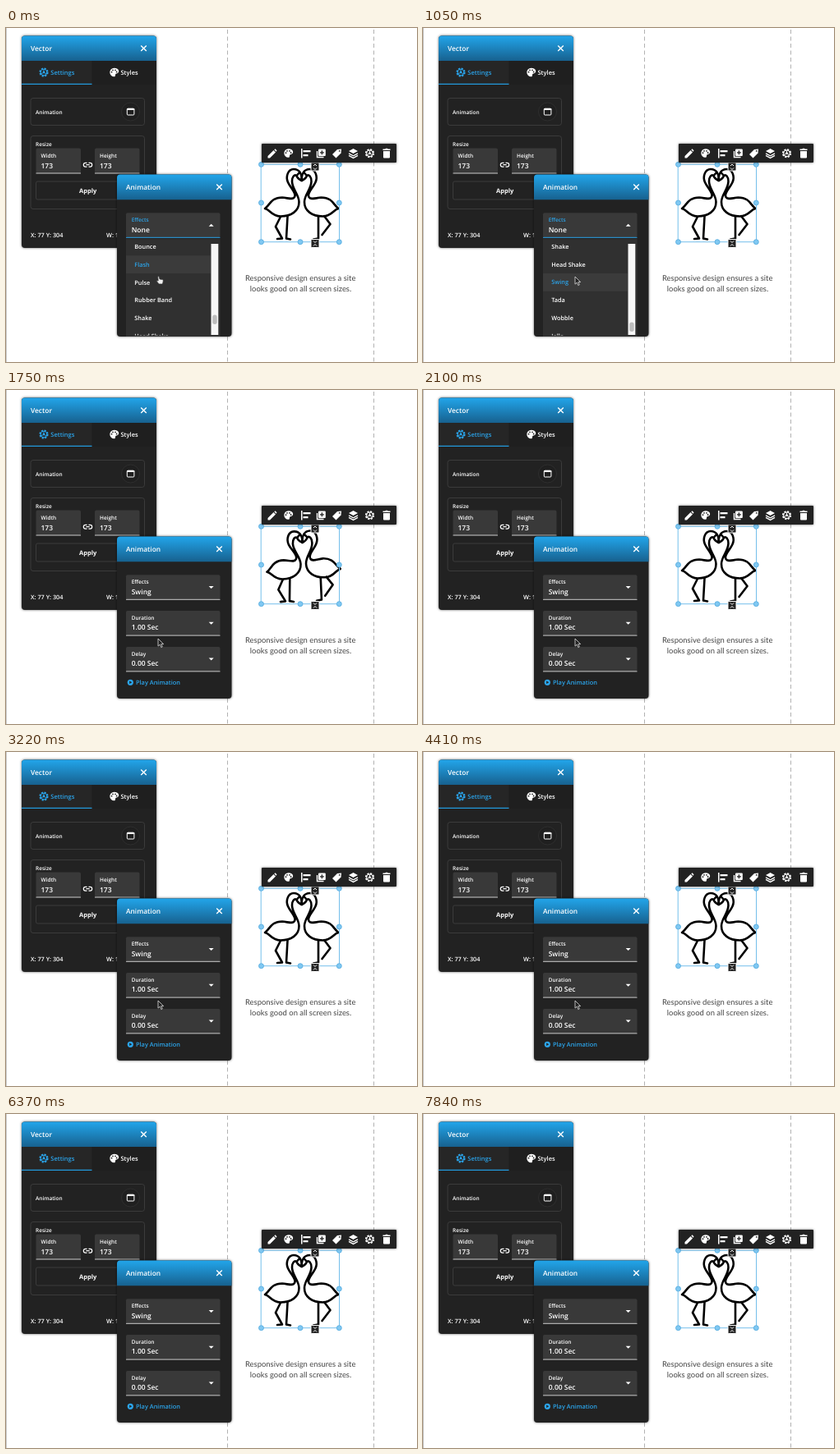
Animation of 500 by 407 pixels, one loop 7910 ms. Source, as an HTML page:

```html
<!DOCTYPE html>
<html lang="en">
<head>
<meta charset="utf-8">
<title>Animation panel</title>
<style>
html, body { margin: 0; width: 100%; height: 100%; overflow: hidden; background: #fff; }
svg { display: block; width: 500px; height: 407px; text-rendering: geometricPrecision; }
text { font: 600 6.5px "Open Sans", "Noto Sans", sans-serif; fill: #fff; }
.title { font-size: 8.4px; }
.tab { font-size: 7.5px; }
.value { font-size: 8.5px; }
.item { font-size: 7.3px; }
.copy { font: 9.45px Lato, sans-serif; fill: #444; text-anchor: middle; }
.blue { fill: #2ba4ea; }
.panel { filter: drop-shadow(0 .5px 1.6px rgba(0,0,0,.6)); }
.card { fill: none; stroke: #424242; stroke-width: .8; }
.field { fill: #393939; }
.line { fill: none; stroke: #fff; stroke-width: 1.4; }
.bird { fill: none; stroke: #000; stroke-width: 2.6; stroke-linejoin: round; stroke-linecap: round; }
</style>
</head>
<body>
<svg viewBox="0 0 500 407">
  <defs>
    <linearGradient id="head" x2="0" y2="1">
      <stop stop-color="#22a5ea"/><stop offset="1" stop-color="#17618f"/>
    </linearGradient>
    <clipPath id="listClip"><rect x="146" y="263.5" width="114" height="111"/></clipPath>
    <g id="gear">
      <circle r="4.7" fill="none" stroke="currentColor" stroke-width="1.8" stroke-dasharray="2.2 1.49"/>
      <circle r="3.7" fill="none" stroke="currentColor" stroke-width="1.1"/>
      <circle r="1.4" fill="currentColor"/>
      <path d="M0 0V-3.5M0 0L3 2M0 0L-3 2" stroke="currentColor" stroke-width=".9"/>
    </g>
    <g id="palette">
      <path d="M0-5.2C7-5.2 7 1.4 3 1.4C.5 1.4 2.6 5.2 0 5.2A5.2 5.2 0 0 1 0-5.2Z" fill="#fff"/>
      <g fill="#222"><circle cx="-3" cy="-.3" r=".9"/><circle cx="-1.5" cy="-2.7" r=".9"/><circle cx="1.5" cy="-2.7" r=".9"/><circle cx="3.1" cy="-.5" r=".9"/></g>
    </g>
    <path id="close" class="line" d="M-3.3-3.3L3.3 3.3M3.3-3.3L-3.3 3.3"/>
    <path id="down" d="M-3-1.4H3L0 1.6Z" fill="#fff"/>
    <path id="flamingo" d="M360 186C360 178 357 172 350 172C343 172 340 181 343 188C346 195 354 201 351 206C349 210 343 207 336 206.500C322 206.500 321 216 315 220C321 221 323 229.500 334 229.500C347 229.500 356.500 223 356.500 212C356.500 203 348 196 348 187C348 181 351 178 353.500 180Q355 184 360 186M353.500 180L357.500 175.500"/>
    <rect id="chip" x="-5" y="-5" width="10" height="10" rx="1" fill="#222"/>
  </defs>

  <rect width="500" height="407" fill="#fff"/>
  <path d="M.5 0V407" stroke="#c8c8c8"/>
  <path d="M269.5 2V407M447.5 2V407" stroke="#b2b2b2" stroke-dasharray="5 3.5"/>

  <g id="birds" class="bird">
    <use href="#flamingo"/>
    <use href="#flamingo" transform="translate(719.500) scale(-1 1)"/>
    <path d="M334 230L328 242L336 256.500L330 257M342.500 230L341 256.500L346 257.500"/>
    <path d="M380 230V256.500L374 257.500M387 229L394.500 239L384.500 252"/>
  </g>
  <rect x="310.2" y="166.3" width="95.3" height="94.4" fill="none" stroke="#74bfeb"/>
  <g id="handles" fill="#80c8f2" stroke="#50a9de" stroke-width=".8"></g>
  <g class="line" style="stroke-width:1">
    <use href="#chip" x="376" y="169"/>
    <path d="M374 168L376 166L378 168M374 170.500L376 172.500L378 170.500"/>
    <use href="#chip" x="376" y="262.500"/>
    <path d="M374 259.500L376 261.500L378 259.500M374 265.500L376 263.500L378 265.500"/>
  </g>

  <rect x="311" y="141" width="164" height="23" rx="1" fill="#222" class="panel"/>
  <g fill="#fff" color="#fff">
    <path d="M319 155.5L326 148.5L328.5 151L321.5 158H319ZM326.8 147.7L328 146.8L330 148.8L329.2 150.2Z" transform="translate(-.5 .5)"/>
    <use href="#palette" x="343.5" y="152.5"/>
    <path d="M359 147H360.5V158.5H359ZM361.5 149H370.5V151.2H361.5ZM361.5 154H367.5V156.2H361.5Z"/>
    <path d="M378.5 150V157.5H386.5" class="line"/>
    <rect x="380" y="147.5" width="8.8" height="8.5" rx="1"/>
    <path d="M384.4 149.3V154.3M381.9 151.8H386.9" stroke="#222" stroke-width="1.3"/>
    <path d="M397 154L403 148L408 147.5L407.5 152.5L401.5 158.5Z"/>
    <circle cx="405.7" cy="149.8" r=".9" fill="#222"/>
    <path d="M422.5 147L428 150L422.5 153L417 150Z"/>
    <path d="M417 152.8L422.5 155.8L428 152.8M417 155.4L422.5 158.4L428 155.4" class="line"/>
    <use href="#gear" x="442.5" y="152.7"/>
    <path d="M459 150H467V157.5Q467 158.6 466 158.6H460Q459 158.6 459 157.5ZM458.5 147.6H461.2L462 146.7H464L464.8 147.6H467.5V149H458.5Z"/>
  </g>
  <text class="copy" x="358.2" y="308.3">Responsive design ensures a site</text>
  <text class="copy" x="358.5" y="320.5">looks good on all screen sizes.</text>

  <g class="panel">
    <rect x="19" y="9.5" width="164" height="258.5" rx="4" fill="#222"/>
    <path d="M19 40V13.5Q19 9.5 23 9.5H179Q183 9.5 183 13.5V40Z" fill="url(#head)"/>
  </g>
  <rect x="19" y="40" width="85.5" height="29" fill="#262626"/>
  <rect x="104.5" y="40" width="78.5" height="29" fill="#1f1f1f"/>
  <path d="M19 68.3H104.5" stroke="#2299dc" stroke-width="1.3"/>
  <text class="title" x="30" y="28">Vector</text>
  <use href="#close" x="167.5" y="24.7"/>
  <use href="#gear" x="46" y="54" color="#2ba4ea"/>
  <text class="tab blue" x="54.3" y="57">Settings</text>
  <use href="#palette" x="131.5" y="54"/>
  <text class="tab" x="139.5" y="57">Styles</text>
  <rect class="card" x="30" y="85.5" width="138.5" height="33" rx="3"/>
  <text x="36" y="104.5">Animation</text>
  <circle cx="151.5" cy="102" r="11" fill="#1f1f1f" stroke="#333" stroke-width=".8"/>
  <rect class="line" x="147.3" y="98.2" width="8.6" height="7.8" rx="1" style="stroke-width:1"/>
  <path d="M147 99H156.2" stroke="#fff" stroke-width="2"/>
  <rect class="card" x="30" y="131.5" width="138.5" height="89" rx="3"/>
  <text x="36" y="144.3">Resize</text>
  <g id="sizes"></g>
  <path class="line" style="stroke-width:1.2" d="M98.500 164.300H96.700A2.400 2.400 0 0 0 96.700 169.100H98.500M100.500 164.300H102.300A2.400 2.400 0 0 1 102.300 169.100H100.500M97.300 166.700H101.700"/>
  <rect class="card" x="36.5" y="187" width="126" height="22" rx="2"/>
  <text class="tab" style="font-weight:700" x="89" y="200.7">Apply</text>
  <text class="item" x="30" y="254.5">X: 77 Y: 304</text>
  <text class="item" x="122" y="254.5">W: 173</text>

  <g class="panel">
    <rect x="135" y="178.5" width="139.5" height="197.5" rx="4" fill="#222"/>
    <path d="M135 209.3V182.5Q135 178.5 139 178.5H270.5Q274.5 178.5 274.5 182.5V209.3Z" fill="url(#head)"/>
  </g>
  <text class="title" x="146" y="197">Animation</text>
  <use href="#close" x="259.5" y="193.7"/>
  <g id="fields"></g>
  <g id="play">
    <circle cx="151.3" cy="356.3" r="3.6" class="blue"/>
    <path d="M150.2 354.5V358.1L153.2 356.3Z" fill="#222"/>
    <text class="blue" style="font-size:7.4px" x="158" y="359.2">Play Animation</text>
  </g>
  <g id="menu">
    <rect x="146" y="257" width="114.5" height="119" fill="#303030"/>
    <g clip-path="url(#listClip)">
      <rect id="hover" x="146" width="103" height="21.8" fill="#3b3b3b"/>
      <g id="list"></g>
    </g>
    <rect x="249.5" y="263" width="8.8" height="111" fill="#f6f6f6"/>
    <rect id="thumb" x="251.3" width="5.4" height="11.5" rx="2.7" fill="#bcbcbc"/>
  </g>
  <g id="cursor">
    <path id="arrow" d="M0 0V9.2L2.2 7.2L3.8 10.6L5.3 9.9L3.8 6.6H6.7Z" fill="#222" stroke="#ddd" stroke-width=".8"/>
    <path id="hand" d="M-.3 0Q1-1 1.3 .5L2 3L5.5 3.6Q6.5 4 6.2 6L5.4 9H1L-1.7 5.6Q-1.7 4.4 .2 5Z" fill="#eee" stroke="#333" stroke-width=".7"/>
  </g>
</svg>
<script>
const LOOP = 7910, STEP = 70, ROW = 21.8;
const $ = id => document.getElementById(id);
const show = (id, on) => $(id).setAttribute('display', on ? 'inline' : 'none');
const set = (id, attr, value) => $(id).setAttribute(attr, value);
const ramp = (t, a, b) => {
  const k = Math.min(1, Math.max(0, (t - a) / (b - a)));
  return k * k * (3 - 2 * k);
};
const effects = ['Bounce', 'Flash', 'Pulse', 'Rubber Band', 'Shake', 'Head Shake', 'Swing', 'Tada', 'Wobble', 'Jello'];
const swing = [0, 15, -10, 5, -5, 0];
const SWING_START = 1120, SWING_TIME = 700;

for (const x of [310.5, 358, 405.3])
  for (const y of [166.3, 213, 260.7])
    if (x !== 358 || y !== 213) $('handles').innerHTML += `<circle cx="${x}" cy="${y}" r="3"/>`;

[['Width', 36.5], ['Height', 108]].forEach(([label, x]) => {
  $('sizes').innerHTML += `<rect class="field" x="${x}" y="146.5" width="54.5" height="30.5" rx="2"/>
    <path d="M${x} 177h54.5" stroke="#ccc"/>
    <text x="${x + 6}" y="157.9">${label}</text><text class="value" x="${x + 6}" y="170.7">173</text>`;
});

[['Effects', ''], ['Duration', '1.00 Sec'], ['Delay', '0.00 Sec']].forEach(([label, value], i) => {
  const y = 225.3 + i * 43.8;
  $('fields').innerHTML += `<g id="field${i}"><rect class="field" x="146" y="${y}" width="114.5" height="30" rx="2"/>
    <path id="rule${i}" d="M146 ${y + 30}h114.5" stroke="#ccc"/>
    <text id="label${i}" x="152.7" y="${y + 10.8}">${label}</text>
    <text id="value${i}" class="value" x="152.7" y="${y + 23.3}">${value}</text>
    <use id="tip${i}" href="#down" transform="translate(249.7 ${y + 15})"/></g>`;
});

effects.forEach((name, i) => {
  $('list').innerHTML += `<text class="item" x="156.3" y="${268.9 + i * ROW}">${name}</text>`;
});

function draw(t) {
  const open = t < SWING_START;
  const scroll = 4 * ROW * ramp(t, 70, 840);
  for (const id of ['field1', 'field2', 'play']) show(id, !open);
  show('menu', open);
  $('value0').textContent = open ? 'None' : 'Swing';
  set('label0', 'class', open ? 'blue' : '');
  set('rule0', 'stroke', open ? '#2ba4ea' : '#ccc');
  set('tip0', 'transform', `translate(249.7 240.3) scale(1 ${open ? -1 : 1})`);

  if (open) {
    const hot = t < STEP ? 1 : Math.round(2 + scroll / ROW);
    set('list', 'transform', `translate(0 ${-scroll})`);
    [...$('list').children].forEach((el, i) => el.classList.toggle('blue', i === hot));
    set('hover', 'y', 255.4 + hot * ROW - scroll);
    set('thumb', 'y', 349.5 + scroll * 9 / (4 * ROW));
  }

  const phase = Math.min(4.9999, Math.max(0, (t - SWING_START) / SWING_TIME * 5));
  const k = Math.floor(phase);
  const angle = t > SWING_START + SWING_TIME ? 0 : swing[k] + (swing[k + 1] - swing[k]) * ramp(phase, k, k + 1);
  set('birds', 'transform', `rotate(${angle} 358 166)`);

  const leave = ramp(t, 5390, 5740);
  show('cursor', leave < 1);
  set('cursor', 'transform', `translate(${185 + 45 * leave} ${303 - 318 * leave})`);
  show('hand', t < 910);
  show('arrow', t >= 910);
}

const start = performance.now();
function tick() {
  const t = (performance.now() - start) % LOOP;
  draw(Math.floor(t / STEP) * STEP);
  requestAnimationFrame(tick);
}
tick();
</script>
</body>
</html>
```
